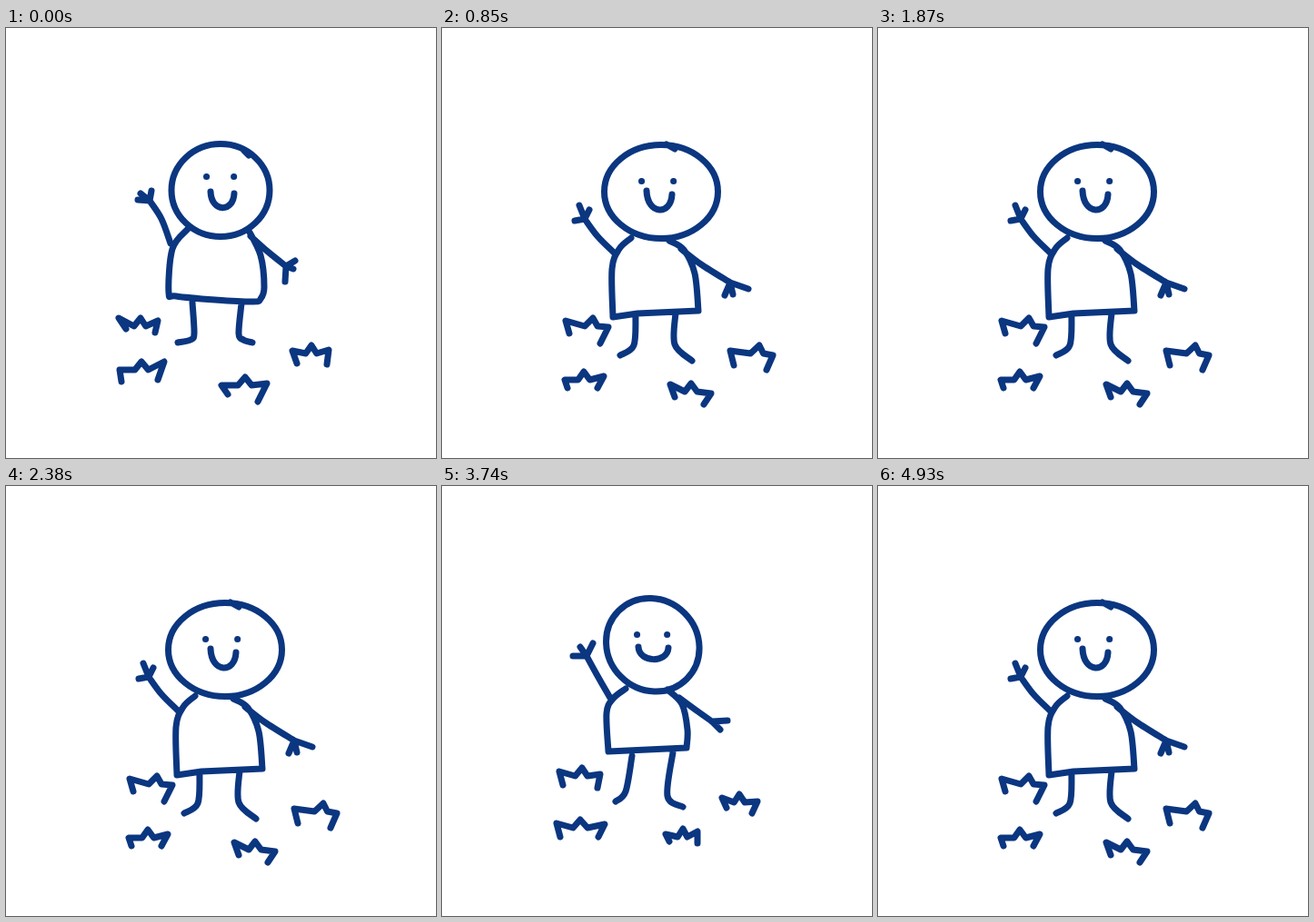
Animation of 473x473 px, one loop 5.1 s. Source, as an HTML page:

```html
<!DOCTYPE html>
<html lang="en">
<head>
<meta charset="utf-8">
<title>Waving doodle</title>
<style>
  html, body { margin: 0; width: 100%; height: 100%; overflow: hidden; background: #fff; }
  svg { display: block; width: 100%; height: 100%; }
  path { fill: none; stroke: #0b3680; stroke-width: 7; stroke-linecap: round; stroke-linejoin: round; }
</style>
</head>
<body>
<svg viewBox="0 0 473 473"></svg>
<script>
const STEP = 170;

const parse = text => text.split(' ').map(pair => pair.split(',').map(Number));
const line = (...pts) => 'M' + pts.join('L');

// Smooth Catmull-Rom stroke through a few points.
function curve(text) {
  const pts = parse(text);
  const at = i => pts[Math.max(0, Math.min(pts.length - 1, i))];
  const handle = (i, sign) => at(i).map((v, k) => v + sign * (at(i + 1)[k] - at(i - 1)[k]) / 6);
  return 'M' + pts[0] + pts.slice(1).map((p, i) => `C${handle(i, 1)} ${handle(i + 1, -1)} ${p}`).join('');
}

function head(cx, cy, rx, ry, tilt = 0) {
  const dx = rx * Math.cos(tilt), dy = rx * Math.sin(tilt);
  const arc = `a${rx},${ry} ${tilt * 180 / Math.PI} 0 1`;
  return `M${cx - dx},${cy - dy}${arc} ${2 * dx},${2 * dy}${arc} ${-2 * dx},${-2 * dy}z`;
}

const eyes = (x, y, gap) => `M${x},${y}h.1m${gap},0h.1`;

const smile = (x, y, width, rise, depth) =>
  `M${x},${y}c1,${depth * 4 / 3} ${width - 1},${depth * 4 / 3} ${width},${rise}`;

// The last point of the arm is the palm, where the fingers fan out.
function arm(text, fingers) {
  const palm = parse(text).pop();
  return curve(text) + parse(fingers).map(tip => line(palm, tip)).join('');
}

// A zigzag tuft: the dips beside its middle blade follow from the other points.
function tuft(text) {
  const [footL, topL, peak, topR, footR] = parse(text);
  const dip = side => [peak[0] + (side[0] - peak[0]) * .3, peak[1] + 9];
  return line(footL, topL, dip(topL), peak, dip(topR), topR, footR);
}

const poses = [
  [
    head(236, 178.5, 54, 51), curve('262,135 267,140'),
    eyes(220.5, 163.5, 30), smile(225, 180, 26, 2, 17.5),
    arm('181,237 171,210 158,190', '145,189 148,182 160,179'),
    arm('269,229 288,246 308,262', '318,256 316,265 307,279'),
    curve('200,221 183,243 179,291 187,295 230,299 272,301 280,298 284,285 280,250 266,221'),
    curve('205,302 207,336 203,343 189,346'), curve('259,303 256,336 261,343 271,346'),
    ...[
      '132,331 124,319 148,319 167,322 164,335',
      '127,389 125,376 149,367 174,367 167,387',
      '244,403 237,393 263,384 287,391 277,411',
      '320,369 315,355 336,349 355,354 353,370'
    ].map(tuft)
  ],
  [
    head(231.8, 174.8, 53, 49.5, Math.PI / 4),
    eyes(214.5, 163.5, 33), smile(216, 177, 33, 1, 13.5),
    arm('185,233 170,207 159,187', '144,187 152,177 166,173'),
    arm('261,233 280,247 297,259', '314,258 306,268'),
    curve('202,223 188,234 181,250 183,292'), line('183,292', '269,288'),
    curve('269,288 270,268 264,240 248,224'),
    curve('209,297 202,336 191,347'), curve('254,293 248,341 265,353'),
    ...[
      '133,329 129,314 154,310 174,317 171,332',
      '130,386 126,371 152,367 179,372 172,386',
      '250,391 246,383 265,377 281,380 281,393',
      '313,354 308,343 327,339 347,347 341,360'
    ].map(tuft)
  ],
  [
    head(241, 180, 62.5, 51.5), curve('247,128 256,133'),
    eyes(219.5, 168.5, 35), smile(225, 179, 28, 4, 20.5),
    arm('189,247 171,229 157,210', '146,212 151,195 162,200'),
    arm('263,243 285,260 317,280', '337,287 311,294 320,293'),
    curve('208,231 195,243 187,265 188,318'), line('188,318', '215,314', '282,311'),
    curve('282,311 278,270 266,244 250,234'),
    curve('213,316 211,349 196,360'), curve('257,313 256,348 275,366'),
    ...[
      '140,336 136,322 166,319 183,329 174,347',
      '138,396 135,387 156,378 178,383 171,396',
      '256,406 251,392 274,391 296,402 288,414',
      '321,371 317,355 349,349 364,360 357,376'
    ].map(tuft)
  ]
];

const svg = document.querySelector('svg');
const duration = STEP * poses.length;

poses.forEach((strokes, i) => {
  const path = document.createElementNS('http://www.w3.org/2000/svg', 'path');
  path.setAttribute('d', strokes.join(''));
  svg.append(path);
  path.animate([
    { opacity: 1, offset: 0, easing: 'step-end' },
    { opacity: 0, offset: 1 / poses.length, easing: 'step-end' },
    { opacity: 0, offset: 1 }
  ], { duration, delay: i * STEP - duration, iterations: Infinity });
});
</script>
</body>
</html>
```
